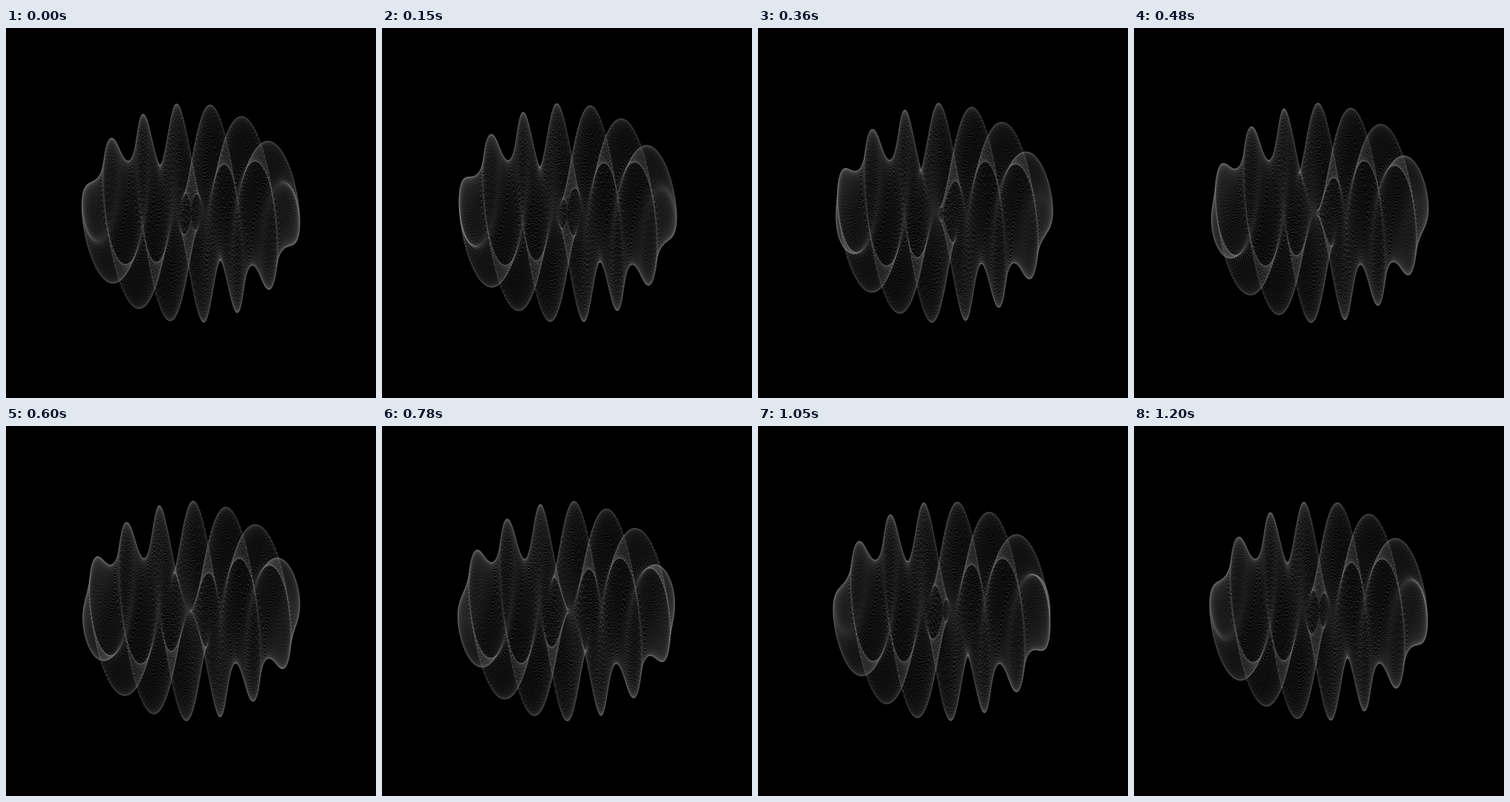
An HTML page with a canvas that plays this animation: 500x500 px, repeating every 1230 ms.

```html
<!DOCTYPE html>
<html lang="en">
<head>
<meta charset="utf-8">
<title>Twisted torus</title>
<style>
  html, body { margin: 0; width: 100%; height: 100%; overflow: hidden; background: #000; }
  canvas { display: block; width: 500px; height: 500px; }
</style>
</head>
<body>
<canvas id="stage" width="500" height="500"></canvas>
<script>
const SIZE = 500, MID = 249.5;
const STEP_MS = 30, STEPS = 41;   // one loop is half a turn
const SCALE = 141;                // outer torus radius in pixels
const CAMERA = 3.2;               // camera distance in torus radii
const TWIST = 10.6;               // radians of twist per torus radius
const ROWS = 300, ROW_DOTS = 800; // dots around the tube and along its widest ring
const GOLDEN = 0.618034;
const DOT = 17, LIMIT = 130;      // light per dot, brightest tone

const ctx = document.getElementById('stage').getContext('2d');
const image = ctx.createImageData(SIZE, SIZE);
const pixels = new Uint32Array(image.data.buffer);
const light = new Float32Array(SIZE * SIZE);

const tones = Uint32Array.from({ length: 2048 }, (_, i) => {
  const v = Math.round(LIMIT * (1 - Math.exp(-i / LIMIT)));
  return (255 << 24 | v << 16 | v << 8 | v) >>> 0;
});

// A torus whose hole closes to a point, wrung around the x axis.
function buildDots() {
  const dots = [];
  for (let row = 0; row < ROWS; row++) {
    const v = 2 * Math.PI * (row + 0.5) / ROWS;
    const ring = 0.5 + 0.5 * Math.cos(v);
    const depth = 0.5 * Math.sin(v);
    const count = Math.ceil(ROW_DOTS * ring);
    const shift = row * GOLDEN % 1;
    for (let i = 0; i < count; i++) {
      const u = 2 * Math.PI * (i + shift) / count;
      const x = ring * Math.cos(u), height = ring * Math.sin(u);
      const sin = Math.sin(-TWIST * x), cos = Math.cos(-TWIST * x);
      dots.push(x, height * sin + depth * cos, height * cos - depth * sin);
    }
  }
  return new Float32Array(dots);
}

// Share a dot's light among the four nearest pixels.
function addDot(x, y) {
  const px = Math.floor(x), py = Math.floor(y);
  const fx = x - px, fy = y - py;
  const i = py * SIZE + px;
  light[i] += DOT * (1 - fx) * (1 - fy);
  light[i + 1] += DOT * fx * (1 - fy);
  light[i + SIZE] += DOT * (1 - fx) * fy;
  light[i + SIZE + 1] += DOT * fx * fy;
}

const dots = buildDots();
let lastStep = -1;

function render(ms) {
  const step = Math.floor(ms / STEP_MS) % STEPS;
  if (step === lastStep) return;
  lastStep = step;

  const turn = (step - 1) * Math.PI / STEPS;
  const sin = Math.sin(turn), cos = Math.cos(turn);
  light.fill(0);
  for (let i = 0; i < dots.length; i += 3) {
    const y = dots[i + 1] * cos + dots[i + 2] * sin;
    const z = dots[i + 2] * cos - dots[i + 1] * sin;
    const zoom = SCALE / (1 - z / CAMERA);
    addDot(MID + dots[i] * zoom, MID - y * zoom);
  }
  for (let i = 0; i < light.length; i++) {
    pixels[i] = tones[Math.min(2047, Math.round(light[i]))];
  }
  ctx.putImageData(image, 0, 0);
}

function tick(now) {
  render(Math.max(0, now));
  requestAnimationFrame(tick);
}

render(0);
requestAnimationFrame(tick);
</script>
</body>
</html>
```
